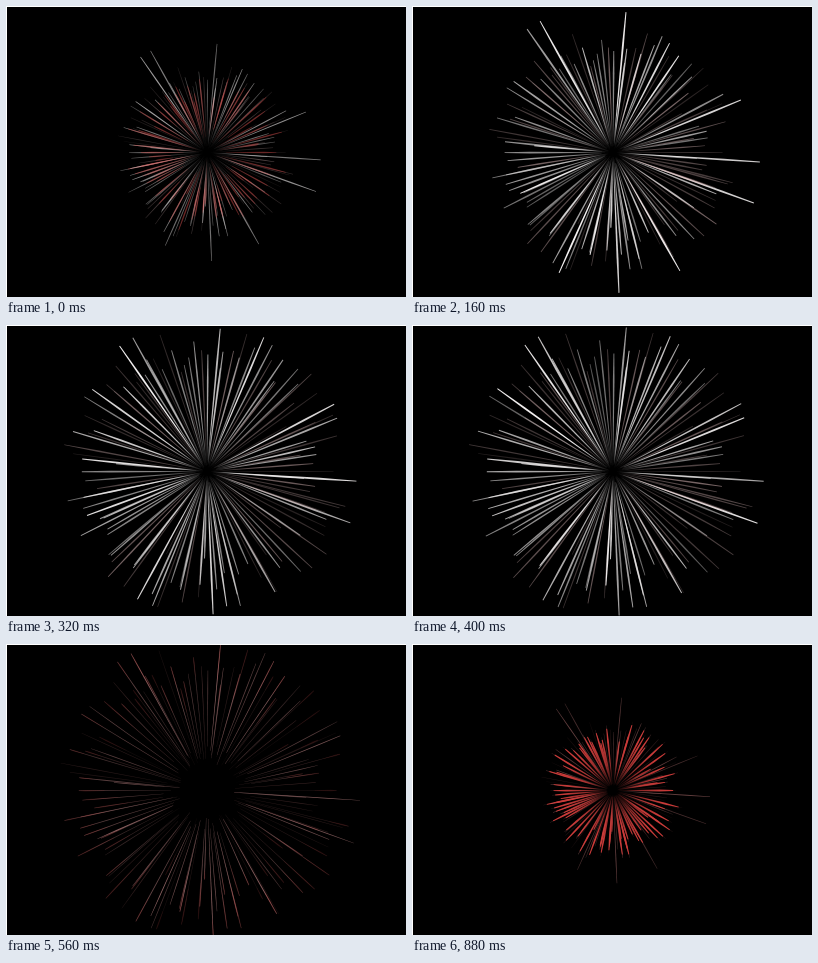
Recreate the animation shown at these times as an HTML page with a canvas. Size 400x291 px, loop 0.96 s.

```html
<!DOCTYPE html>
<html lang="en">
<head>
<meta charset="utf-8">
<title>Firework burst</title>
<style>
html, body { margin: 0; height: 100%; overflow: hidden; background: #000; }
canvas { display: block; width: 100vw; height: 100vh; }
</style>
</head>
<body>
<canvas id="stage" width="400" height="291"></canvas>
<script>
const ctx = document.getElementById('stage').getContext('2d');
const W = 400, H = 291, CX = 201, CY = 146.5;
const STEP = 80, STEPS = 12, COUNT = 116;

let seed = 41;
const rnd = () => {
  seed = (seed * 16807) % 2147483647;
  return seed / 2147483647;
};
const ramp = (v, from, to) => Math.min(1, Math.max(0, (v - from) / (to - from)));
const mix = (a, b, u) => a + (b - a) * u;

const makeRay = (angle, length, fast) => ({
  cos: Math.cos(angle), sin: Math.sin(angle), length, fast,
  light: fast ? 1 : .22 + .78 * Math.pow(rnd(), 1.2),
  lag: rnd(),
  phase: rnd() * 2 * Math.PI,
  glow: rnd() < .6
});

// A few leading rays shoot ahead; the rest fill the circle at random.
const leaders = [
  [348, 156], [342, 197], [329, 94], [268, 265], [207, 287],
  [214, 6], [128, 15], [115, 23], [147, 267]
];
const rays = leaders.map(([x, y]) =>
  makeRay(Math.atan2(y - CY, x - CX), Math.hypot(x - CX, y - CY), true));
for (let i = 0; i < COUNT; i++) {
  const angle = (i + 1.6 * rnd()) / COUNT * 2 * Math.PI;
  rays.push(makeRay(angle, 82 + 64 * Math.sqrt(rnd()), false));
}

// Strokes fade out toward the dark core.
function fade(r, g, b) {
  const grad = ctx.createRadialGradient(CX, CY, 3, CX, CY, 52);
  [[0, 0], [.2, .2], [.5, .7], [1, 1]].forEach(([at, a]) =>
    grad.addColorStop(at, `rgba(${r},${g},${b},${a})`));
  return grad;
}

// A sliver that is widest shortly before its tip.
function sliver(ray, from, to, width) {
  const { cos, sin } = ray;
  const point = (r, w) => [CX + cos * r - sin * w, CY + sin * r + cos * w];
  const wide = mix(from, to, .75), half = width / 2;
  ctx.beginPath();
  ctx.moveTo(...point(from, half * .35));
  ctx.lineTo(...point(wide, half));
  ctx.lineTo(...point(to, half * .5));
  ctx.lineTo(...point(to, -half * .5));
  ctx.lineTo(...point(wide, -half));
  ctx.lineTo(...point(from, -half * .35));
  ctx.fill();
}

function draw(step) {
  const fast = Math.min(.66 + .113 * step, .975 + .0083 * step);
  const slow = Math.min(.5 + .122 * step, .96 + .008 * step);
  const open = ramp(step, 0, 3);
  const decay = ramp(step, 6, 11);
  const birth = 1 - open;
  const ember = ramp(step, 7.5, 10) * (1 - .6 * ramp(step, 10, 11));
  const warm = Math.max(.6 * (1 - ramp(step, 0, 1)), ramp(step, 6, 10));
  const width = mix(.8, 1.7, open) - .9 * ramp(step, 6, 8);
  const alpha = mix(.5, 1, open) * (1 - .85 * decay);
  const tail = 4 + 58 * decay, spread = 8 + 24 * decay;

  ctx.globalAlpha = 1;
  ctx.fillStyle = '#000';
  ctx.fillRect(0, 0, W, H);

  const tone = (r, g) => fade(mix(r, 190, warm), mix(g, 62, warm), mix(g, 62, warm));
  const white = tone(245, 242), rose = tone(225, 190), red = fade(202, 58, 56);

  for (const ray of rays) {
    const reach = ray.length * (ray.fast ? fast : slow);
    const start = Math.min(tail + spread * ray.lag, reach * .85);
    const twinkle = .82 + .18 * Math.sin(step * 1.3 + ray.phase);
    ctx.fillStyle = ray.light > .55 ? white : rose;
    ctx.globalAlpha = alpha * ray.light * twinkle;
    sliver(ray, start, reach, width * mix(.6, 1.1, ray.light));
    if (!ray.glow) continue;

    ctx.fillStyle = red;
    if (birth > 0 && !ray.fast) {
      const shift = ray.lag * ramp(step, 0, 1);
      ctx.globalAlpha = birth * birth;
      sliver(ray, reach * (.1 + .4 * shift), reach * (.95 - .2 * shift), .8 + birth);
    }
    if (ember > 0) {
      ctx.globalAlpha = ember * mix(.5, 1, ray.light);
      sliver(ray, reach * (.9 - .2 * ray.lag), reach, 1.4);
    }
  }

  ctx.globalAlpha = 1;
  ctx.fillStyle = '#fff';
  ctx.fillRect(0, 0, W, 1);
  ctx.fillRect(0, 0, 1, H);
}

let shown = -1;
function tick() {
  const step = (Math.floor(performance.now() / STEP) + 1) % STEPS;
  if (step !== shown) draw(shown = step);
  requestAnimationFrame(tick);
}
tick();
</script>
</body>
</html>
```
